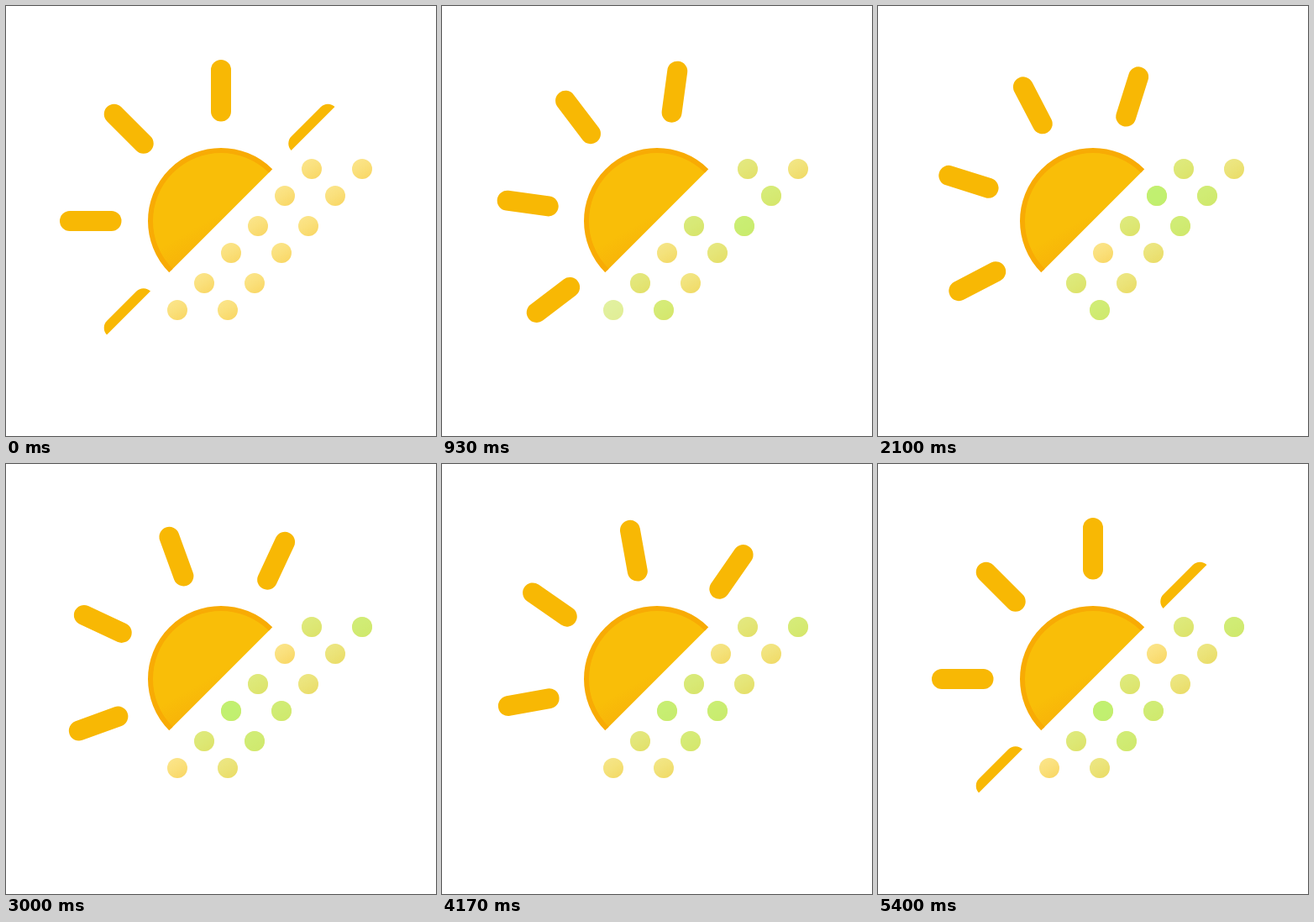
An HTML page with a canvas that plays this animation: 512x512 px, repeating every 5430 ms.

```html
<!DOCTYPE html>
<html lang="en">
<head>
<meta charset="utf-8">
<title>Half sun with pollen</title>
<style>
  html, body { margin: 0; width: 100%; height: 100%; overflow: hidden; background: #fff; }
  canvas { display: block; width: 100vw; height: 100vh; }
</style>
</head>
<body>
<canvas id="stage" width="512" height="512"></canvas>
<script>
const ctx = document.getElementById('stage').getContext('2d');
const LOOP = 5430, STEP = 30, TURN = 5400, PULSE = 600;

function gradient(x1, y1, x2, y2, stops) {
  const g = ctx.createLinearGradient(x1, y1, x2, y2);
  for (const [at, color] of stops) g.addColorStop(at, color);
  return g;
}

function disc(x, y, r, fill) {
  ctx.beginPath();
  ctx.arc(x, y, r, 0, Math.PI * 2);
  ctx.fillStyle = fill;
  ctx.fill();
}

const sunFill = gradient(-42, -73, 42, 73, [[0, '#f9be08'], [.45, '#f9be08'], [1, '#f59e0b']]);
const dotFill = gradient(-6, -10, 6, 10, [[0, '#fbe488'], [.45, '#fae07c'], [1, '#f9d868']]);

function drawSun(t) {
  ctx.save();
  // Only the half above the rising diagonal shows
  ctx.beginPath();
  ctx.moveTo(0, 0);
  ctx.lineTo(511.5, 0);
  ctx.lineTo(0, 511.5);
  ctx.clip();

  ctx.translate(256, 256);
  disc(0, 0, 84, sunFill);
  ctx.strokeStyle = '#f8ab04';
  ctx.lineWidth = 6;
  ctx.stroke();

  ctx.rotate(t / TURN * Math.PI / 4);
  ctx.strokeStyle = '#f8b804';
  ctx.lineWidth = 24;
  ctx.lineCap = 'round';
  for (let i = 0; i < 8; i++) {
    ctx.beginPath();
    ctx.moveTo(0, -130.5);
    ctx.lineTo(0, -180);
    ctx.moveTo(0, 0);
    ctx.stroke();
    ctx.rotate(Math.PI / 4);
  }
  ctx.restore();
}

function drawDot(x, y, phase, alpha) {
  ctx.save();
  ctx.translate(x, y);
  ctx.globalAlpha = alpha;
  disc(0, 0, 12, dotFill);
  ctx.globalAlpha = alpha * (1 - Math.abs(2 * phase - 1)) * .95;
  disc(0, 0, 12, '#bef070');
  ctx.restore();
}

// Dots of the inner row blink out just past their greenest point
function visibility(i, phase) {
  if (i === 0) return phase < .47 || phase > .59 ? 1 : phase < .53 ? 0 : .5;
  return phase > .51 && phase < .62 ? 0 : 1;
}

function drawDots(t) {
  const phaseAt = begin => t < begin ? 0 : (t - begin) % PULSE / PULSE;
  for (let i = 0; i < 6; i++) {
    const x = 204 + 32 * i, y = 362 - 34 * i + i % 2 * 2;
    const inner = phaseAt((4 - i % 4) % 4 * 150);
    drawDot(x, y, inner, visibility(i, inner));
    drawDot(x + 60, y, phaseAt(525 - i % 4 * 150), 1);
  }
}

function frame() {
  const t = Math.floor(performance.now() % LOOP / STEP) * STEP;
  ctx.clearRect(0, 0, 512, 512);
  drawSun(t);
  drawDots(t);
  requestAnimationFrame(frame);
}
frame();
</script>
</body>
</html>
```
